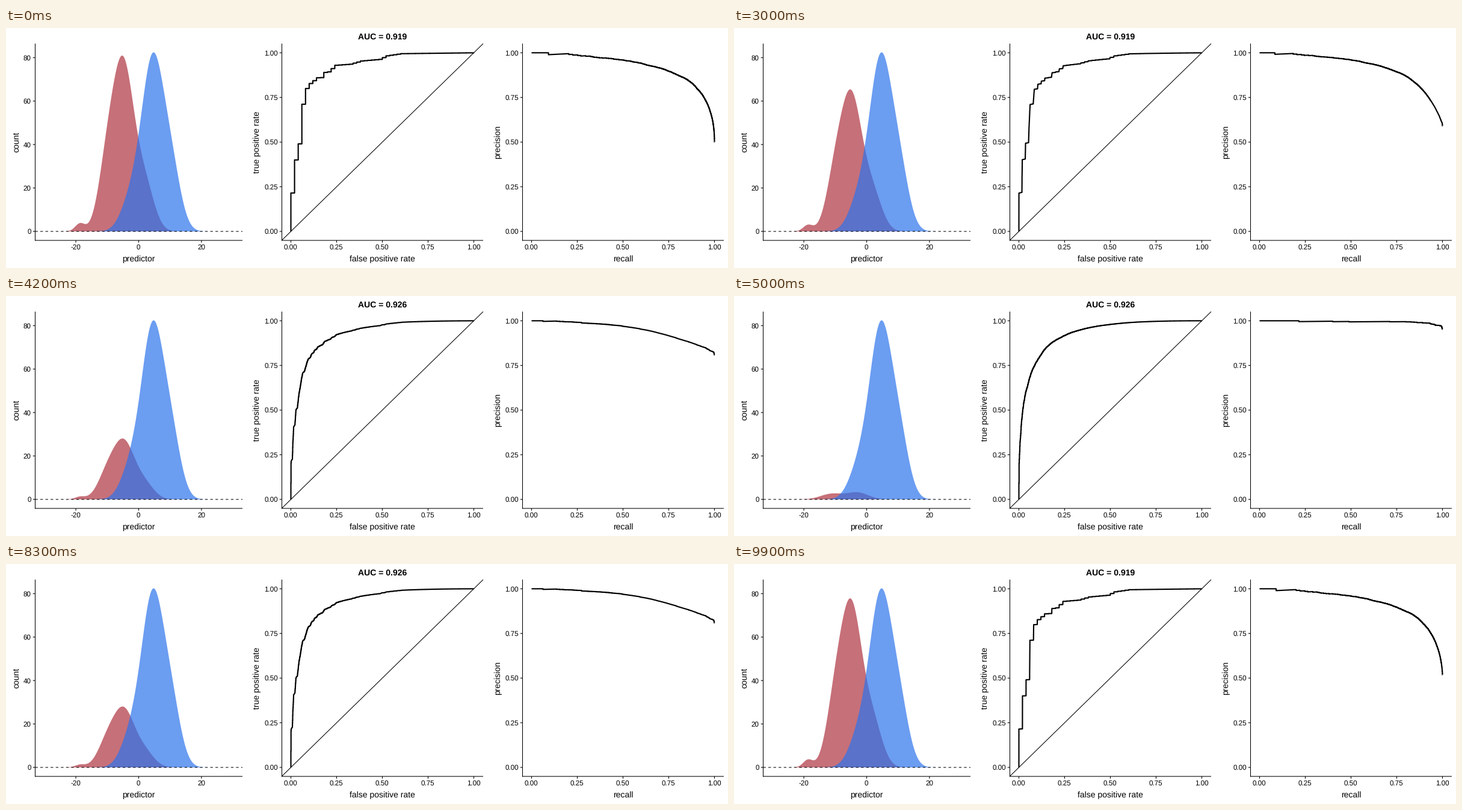
A matplotlib script for the animation above (10000 ms loop, 1200 by 400 pixels).

```python
import math

import numpy as np
import matplotlib.pyplot as plt
from matplotlib.animation import FuncAnimation

plt.rcParams["font.family"] = "Liberation Sans"
plt.rcParams["text.hinting"] = "none"

W, H, DPI = 1200, 400, 100
PX = 72 / DPI
FRAMES, INTERVAL = 100, 100
HOLD, MOVE = 25, 25
TOP, BASE, FLOOR = 26, 339, 354
SPAN_X, SPAN_Y = 304, 297.7
ROC_X0, PR_X0 = 473.5, 873.5
THIN, THICK = 1.07 * PX, 2.13 * PX
MANY, FEW = 1000, 50      # negatives at either end of the motion
SEPARATION = 2.05         # distance of the two classes in deviations

rng = np.random.default_rng(4)

fig = plt.figure(figsize=(W / DPI, H / DPI), dpi=DPI, facecolor="white")
ax = fig.add_axes([0, 0, 1, 1])
ax.set_xlim(0, W)
ax.set_ylim(H, 0)
ax.axis("off")


def line(x, y, lw=THIN, **kw):
    kw = {"solid_capstyle": "butt", "solid_joinstyle": "round", **kw}
    return ax.plot(x, y, color="black", lw=lw, snap=False, **kw)[0]


def label(x, y, s, size=14, **kw):
    kw = {"ha": "center", "va": "baseline", **kw}
    return ax.text(x, y, s, fontsize=size * PX, color="black", **kw)


def panel(left, right, xticks, yticks, xname, yname, name_x):
    """Axis lines, ticks and names; ticks are (pixel, text) pairs."""
    line([left, left], [TOP, FLOOR + 0.5])
    line([left - 0.5, right], [FLOOR, FLOOR])
    for x, s in xticks:
        line([x, x], [FLOOR, FLOOR + 3.7])
        label(x - 0.5, 369.2, s, 11.6)
    for y, s in yticks:
        line([left - 3.7, left], [y, y])
        label(left - 6.8, y + 4.2, s, 11.6, ha="right")
    label((left + right) / 2 - 0.3, 388.8, xname)
    label(name_x, 190, yname, rotation=90, rotation_mode="anchor")


def unit_ticks(origin, span):
    return [(origin + span * v, f"{v:.2f}") for v in np.linspace(0, 1, 5)]


def bells(x, *parts):
    """Sum of bell curves given as (centre, height, width) in pixels."""
    return BASE - sum(h * np.exp(-((x - c) / w) ** 2 / 2) for c, h, w in parts)


def stairs(fpr, tpr):
    """Staircase that rises to each tpr at its fpr, then runs to (1, 1)."""
    x = np.r_[0, np.repeat(fpr, 2), 1]
    y = np.r_[0, 0, np.repeat(tpr, 2)]
    return np.array([np.r_[x[1:], 1], np.r_[y[1:], 1]])


def precision_recall(roc, negatives):
    """Curve of (recall, precision) for a thousand positives."""
    x, y = roc
    false = x * negatives / 1000
    return np.array([y, np.where(y > 0, y / np.maximum(y + false, 1e-9), 1)])


def paired(a, b, rank_a, rank_b):
    """Sample two curves at shared ranks so they can be blended."""
    ra, rb = rank_a / rank_a[-1], rank_b / rank_b[-1]
    s = np.union1d(ra, rb)
    return [np.array([np.interp(s, r, v) for v in c])
            for r, c in ((ra, a), (rb, b))]


# Densities
grid = np.arange(90, 345, 0.5)
red_a = bells(grid, (195, 274, 18), (167, 88, 14.5), (231.5, 69, 15.5),
              (123, 13, 8))
red_b = bells(grid, (205, 11.5, 18), (162, 9.2, 18))
blue = bells(grid, (244, 284, 18.8), (276, 85, 15.5), (207, 47, 16.5))

# Many negatives: two normal classes with slightly uneven ranks
z = np.linspace(-6, 6, 4001)
phi = np.array([0.5 + 0.5 * math.erf(v / math.sqrt(2)) for v in z])
gaps = rng.gamma(9, 1 / 9, MANY)
share = (np.cumsum(gaps) - 0.4) / gaps.sum()
tpr = np.interp(SEPARATION + np.interp(share, phi, z), z, phi)
roc_many = stairs(np.arange(MANY) / MANY, tpr)

# Few negatives: coarse steps through some heights
keys = np.array([(0, .215), (.02, .40), (.04, .49), (.06, .712), (.08, .80),
                 (.10, .828), (.14, .86), (.16, .861), (.18, .89), (.20, .893),
                 (.24, .93), (.32, .936), (.38, .954), (.48, .963), (.52, .983),
                 (.60, .995), (1, 1)]).T
steps = np.arange(FEW) / FEW
roc_few = stairs(steps, np.interp(steps, *keys))

roc_a, roc_b = paired(roc_few, roc_many, roc_few.sum(0), roc_many.sum(0))
pr_a, pr_b = paired(precision_recall(roc_many, MANY),
                    precision_recall(roc_few, FEW),
                    roc_many[1] + roc_many[0],
                    roc_few[1] + roc_few[0] * FEW / MANY)

red_area, = ax.fill(grid, red_a, color="#af3341", alpha=0.7, lw=0)
ax.fill(grid, blue, color="#2d74ec", alpha=0.7, lw=0)
line([48.5, 393], [BASE, BASE], dashes=(4, 4), dash_capstyle="butt")
line([458.5, 793], [353.7, 26.1])

count_ticks = [(BASE - 3.62 * v, str(v)) for v in range(0, 81, 20)]
value_ticks = [(220.5 + 5.22 * v, str(v)) for v in (-20, 0, 20)]
rates = unit_ticks(BASE, -SPAN_Y)
panel(48.5, 393, value_ticks, count_ticks, "predictor", "count", 21)
panel(458.5, 793, unit_ticks(ROC_X0, SPAN_X), rates,
      "false positive rate", "true positive rate", 421.3)
panel(858.5, 1193, unit_ticks(PR_X0, SPAN_X), rates,
      "recall", "precision", 821.3)

roc_line = line([], [], THICK)
pr_line = line([], [], THICK)
title = label(625.5, 19, "", weight="bold")


def mix(a, b, p):
    return a + (b - a) * p


def place(artist, xy, x0):
    artist.set_data(x0 + SPAN_X * xy[0], BASE - SPAN_Y * xy[1])


def update(i):
    p = (np.clip((i - HOLD) / MOVE, 0, 1)
         - np.clip((i - 2 * HOLD - MOVE) / MOVE, 0, 1))
    y = mix(red_a, red_b, p)
    red_area.set_xy(np.column_stack([np.r_[grid, grid[::-1]],
                                     np.r_[y, np.full_like(y, BASE)]]))
    place(roc_line, mix(roc_a, roc_b, p), ROC_X0)
    place(pr_line, mix(pr_a, pr_b, p), PR_X0)
    title.set_text("AUC = 0.926" if p >= 0.5 else "AUC = 0.919")
    return red_area, roc_line, pr_line, title


anim = FuncAnimation(fig, update, frames=FRAMES, interval=INTERVAL,
                     repeat=True, repeat_delay=0, blit=False)
plt.show()
```
